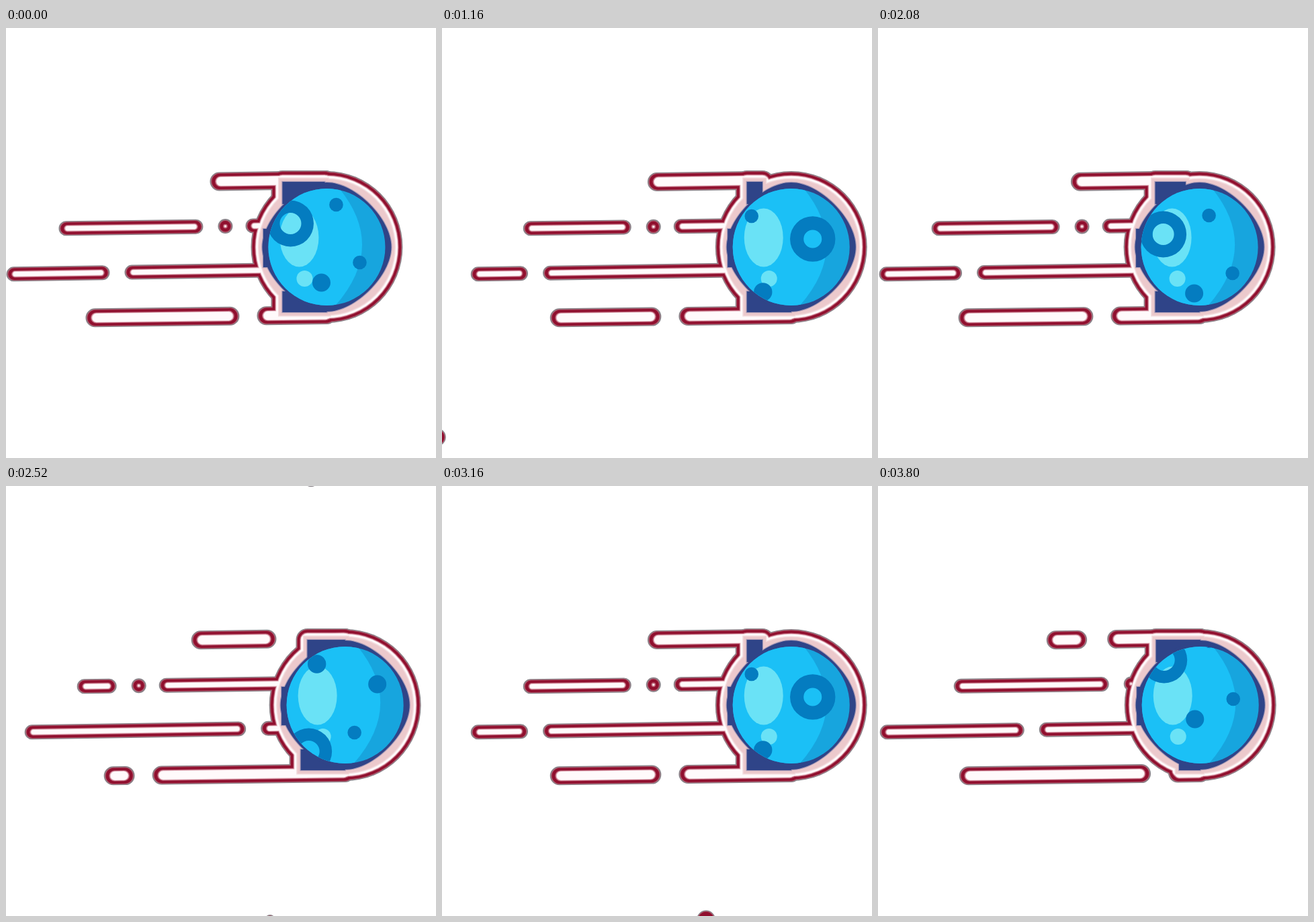
Write an HTML page with a canvas that moves like this. It is 640 by 640 pixels and loops after 3.84 s.

```html
<!DOCTYPE html>
<html lang="en">
<head>
<meta charset="utf-8">
<title>Comet</title>
<style>
  html, body { margin: 0; width: 100%; height: 100%; overflow: hidden; background: #fff; }
  canvas { display: block; width: 640px; height: 640px; }
</style>
</head>
<body>
<canvas id="stage" width="640" height="640"></canvas>
<script>
const ctx = document.getElementById('stage').getContext('2d');
const LOOP = 3840, STEP = 40, CYCLE = 1960, FLOW = CYCLE / 2;
const CX = 478, CY = 326, R = 87, NAVY_R = 96, RIM = 17;

// Trails: h = half thickness, end = first gap's left side, span = gap spacing.
const trails = [
  { y: 233, tilt: -.0145, h: 14, left: 249, right: CX, end: 274, gap: 30, span: 217, bar: [229, 262] },
  { y: 299.5, tilt: -.0135, h: 11, left: 79, right: 385, end: 294, gap: 63, span: 294, dot: 33 },
  { y: 366.5, tilt: -.0155, h: 11, left: 1, right: 388, end: 155, gap: 22, span: 374 },
  { y: 433, tilt: -.0125, h: 14, left: 119, right: CX, end: 348, gap: 26, span: 345, bar: [392, 423] }
];

// Craters: x from the ball centre, y at time zero, radius, hole radius.
const craters = [
  [14, 263, 10.3], [49, 349, 10.3], [-8, 379, 13.5], [-54, 291, 34.5, 16],
  [-42, 161, 13.7], [48, 191, 13.5], [-59, 48, 10.3], [32, 82, 33.7, 13.5]
];

// Sparks at the stage edge: x, y, top radius, time of top, fall-off.
const sparks = [
  [-7.5, 609, 13.3, 1200, 9.6e-6],
  [393, 645.5, 14, 3100, 1.9e-5],
  [454, -10, 12, 2360, 3.1e-5]
];

// Rim layers: inset from the outer edge and colour.
const rim = [
  [0, '#8b858b'], [1.3, '#ab5468'], [2.3, '#900f2e'],
  [5.8, '#b85a70'], [6.8, '#e6bcc5'], [7.7, '#fffafb']
];
const inner = [[10.5, '#f3dcde'], [12, '#ecc9cc']];

const mod = (a, n) => ((a % n) + n) % n;

function disc(x, y, r, color) {
  if (r <= 0) return;
  ctx.fillStyle = color;
  ctx.beginPath();
  ctx.arc(x, y, r, 0, 2 * Math.PI);
  ctx.fill();
}

// Pieces of each trail between the moving gaps, and the navy bars on them.
function layout(p) {
  const lines = [], bars = [];
  for (const t of trails) {
    const add = (a, b) => {
      if (b >= a) lines.push({ a, b, h: t.h, ya: t.y + t.tilt * a, yb: t.y + t.tilt * b });
    };
    const first = t.end - t.span * mod(p, FLOW) / FLOW;
    for (let k = -2; k < 3; k++) {
      const e = first + k * t.span, from = e + t.gap, to = e + t.span;
      add(Math.max(from, t.left) + t.h, Math.min(to - t.h, t.right));
      if (t.dot) {
        const d = e + t.dot;
        if (d > t.left + t.h && d < t.right) add(d, d);
      }
      if (t.bar) {
        const x0 = Math.max(412, from + 16), x1 = Math.min(CX, to - 16);
        if (x1 > x0) bars.push([x0, t.bar[0], x1 - x0, t.bar[1] - t.bar[0]]);
      }
    }
  }
  return { lines, bars };
}

function fillBars(bars, grow, color) {
  ctx.fillStyle = ctx.strokeStyle = color;
  ctx.lineWidth = 2 * grow;
  ctx.lineJoin = grow < 8 ? 'miter' : 'round';
  for (const b of bars) {
    ctx.fillRect(...b);
    if (grow) ctx.strokeRect(...b);
  }
}

function body(bars, grow, color) {
  disc(CX, CY, NAVY_R + grow, color);
  fillBars(bars, grow, color);
}

// Navy backing: a circle flattened on its diagonals.
function backing(bars, grow, color) {
  const r = NAVY_R + grow, k = r * .44;
  fillBars(bars, grow, color);
  ctx.fillRect(383.5 - grow, 299 - grow, 20, 57 + 2 * grow);
  ctx.beginPath();
  ctx.moveTo(CX, CY - r);
  ctx.bezierCurveTo(CX + k, CY - r, CX + r, CY - k, CX + r, CY);
  ctx.bezierCurveTo(CX + r, CY + k, CX + k, CY + r, CX, CY + r);
  ctx.bezierCurveTo(CX - k, CY + r, CX - r, CY + k, CX - r, CY);
  ctx.bezierCurveTo(CX - r, CY - k, CX - k, CY - r, CX, CY - r);
  ctx.fill();
}

// Inner layers draw in a little at the tips, so the tips look heavier.
function strokes(lines, inset, color) {
  ctx.strokeStyle = color;
  ctx.lineCap = 'round';
  for (const l of lines) {
    const half = (l.b - l.a) / 2, pull = Math.min(inset * .3, half);
    const thin = inset + inset * .3 - pull;
    ctx.lineWidth = 2 * Math.max(l.h - thin, .5);
    ctx.beginPath();
    ctx.moveTo(l.a + pull, l.ya);
    ctx.lineTo(l.b - pull + .01, l.yb);
    ctx.stroke();
  }
}

function ball(p) {
  ctx.save();
  ctx.beginPath();
  ctx.arc(CX, CY, R, 0, 2 * Math.PI);
  ctx.clip();
  disc(CX, CY, R + 1, '#17a5de');
  ctx.fillStyle = '#1bc0f6';
  ctx.beginPath();
  ctx.moveTo(CX + 18, CY - 88);
  ctx.quadraticCurveTo(CX + 90, CY, CX + 12, CY + 88);
  ctx.lineTo(CX - 90, CY + 88);
  ctx.lineTo(CX - 90, CY - 88);
  ctx.fill();
  ctx.fillStyle = '#6ae2f6';
  ctx.beginPath();
  ctx.ellipse(CX - 41, CY - 14, 29, 43.5, 0, 0, 2 * Math.PI);
  ctx.fill();
  disc(CX - 33, CY + 47, 12, '#6ae2f6');
  const travel = CYCLE / 5;
  ctx.fillStyle = '#047cc0';
  for (const [x, y0, r, hole] of craters) {
    const y = mod(y0 + p / 5 - 150, travel) + 150;
    ctx.beginPath();
    ctx.arc(CX + x, y, r, 0, 2 * Math.PI);
    if (hole) ctx.arc(CX + x, y, hole, 0, 2 * Math.PI);
    ctx.fill('evenodd');
  }
  ctx.restore();
}

function draw(t) {
  // A short stall in the first pass.
  const p = t < 1640 ? t : t < 1720 ? 1600 : t - 40;
  const { lines, bars } = layout(p);
  ctx.clearRect(0, 0, 640, 640);

  for (const [x, y, top, at, fall] of sparks) {
    const r = top - fall * (t - at) ** 2;
    disc(x, y, r, '#8b858b');
    disc(x, y, r - 1.3, '#ab5468');
    disc(x, y, r - 2.3, '#900f2e');
  }

  ctx.save();
  ctx.translate(23.5 * (1 - Math.cos(2 * Math.PI * (p + 20) / CYCLE)) - .6, 0);
  for (const [inset, color] of rim) {
    body(bars, RIM - inset, color);
    strokes(lines, inset, color);
  }
  for (const [inset, color] of inner) body(bars, RIM - inset, color);
  backing(bars, 1.2, '#a99ab5');
  backing(bars, 0, '#2f4488');
  ball(p);
  ctx.restore();
}

const start = performance.now();
function tick() {
  const t = (performance.now() - start) % LOOP;
  draw(Math.floor(t / STEP) * STEP);
  requestAnimationFrame(tick);
}
tick();
</script>
</body>
</html>
```
